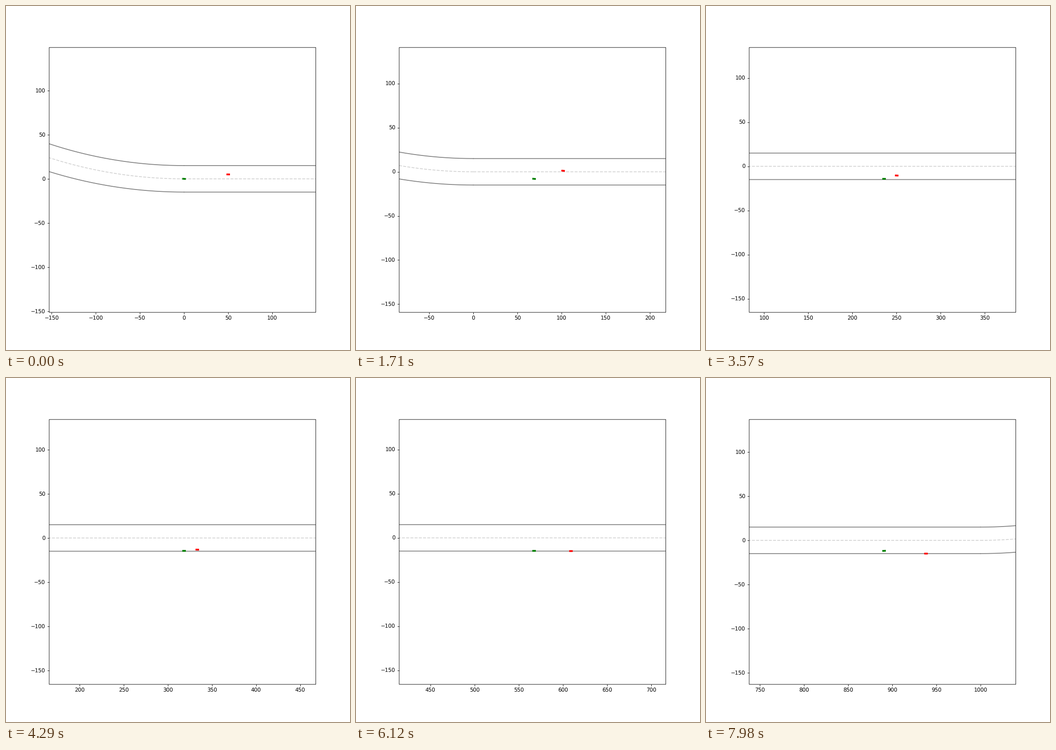
A matplotlib script that plays this animation: 748 px wide and 748 px high, repeating every 8000 ms.

```python
import numpy as np
import matplotlib.pyplot as plt
from matplotlib.animation import FuncAnimation
from matplotlib.patches import Rectangle
from matplotlib.ticker import MultipleLocator

# Soft, unsnapped edges and glyphs, as in a smoothly scaled picture.
plt.rcParams["path.snap"] = False
plt.rcParams["text.hinting"] = "none"

SIZE, INCHES = 748, 9
FRAMES, LOOP_MS = 267, 8000
STRAIGHT, RADIUS, HALF_ROAD = 1000, 500, 15
CAR_L, CAR_W = 4, 2
VIEW = 150
ACCEL, TOP_SPEED, EASE_BAND = 0.025, 5.36, 0.45


def drive(x, v, brake=range(0)):
    """Positions of a car that speeds up, easing off near top speed."""
    xs = []
    for n in range(FRAMES):
        xs.append(x)
        x += v
        if n in brake:
            v -= 2 * ACCEL
        else:
            v += ACCEL * min(1, (TOP_SPEED - v) / EASE_BAND)
    return np.array(xs)


def drift(x, y0, y1, length, power):
    """Smooth change of lane from y0 to y1."""
    return y1 + (y0 - y1) * np.exp(-((x - x[0]) / length) ** power)


def heading(x, y):
    return np.degrees(np.arctan(np.gradient(y, x)))


green_x = drive(0, 0.5065, brake=range(127, 137))
green_y = drift(green_x, 0, -14.7, 84.7, 1.18)
green_y += 0.00023 * np.maximum(green_x - 780, 0) ** 2
green_a = heading(green_x, green_y)

red_x = drive(50, 0.2065)
red_y = drift(red_x, 5, -15, 152.5, 1.43)
red_a = heading(red_x, red_y)

fig, ax = plt.subplots(figsize=(INCHES, INCHES), dpi=SIZE / INCHES)
ax.xaxis.set_major_locator(MultipleLocator(50))
ax.yaxis.set_major_locator(MultipleLocator(50))

# The frame sits a fraction of a pixel right of and below the plot area.
box = ax.get_position()
half_w = VIEW * box.width / box.height
nudge = 0.415 / SIZE
ax.spines[:].set_visible(False)
fig.add_artist(Rectangle((box.x0 + nudge, box.y0 - nudge),
                         box.width, box.height,
                         transform=fig.transFigure, fill=False, lw=0.8))


def draw_lane(offset, **style):
    """One line of the oval road, shifted to the inside by offset."""
    r = RADIUS - offset
    turn = np.linspace(-np.pi / 2, np.pi / 2, 200)
    ax.plot([0, STRAIGHT], [offset, offset], **style)
    ax.plot(STRAIGHT + r * np.cos(turn), RADIUS + r * np.sin(turn), **style)
    ax.plot(-r * np.cos(turn), RADIUS + r * np.sin(turn), **style)


draw_lane(HALF_ROAD, color="gray")
draw_lane(-HALF_ROAD, color="gray")
draw_lane(0, color="lightgray", ls="--")


def add_car(color):
    car = Rectangle((0, 0), CAR_L, CAR_W, rotation_point="center",
                    fc=color, lw=0, zorder=3)
    return ax.add_patch(car)


green, red = add_car("green"), add_car("red")


def place(car, x, y, angle):
    car.set_xy((x - CAR_L / 2, y - CAR_W / 2))
    car.set_angle(angle)


def update(n):
    place(green, green_x[n], green_y[n], green_a[n])
    place(red, red_x[n], red_y[n], red_a[n])
    cx, cy = green.get_xy()
    ax.set_xlim(cx - half_w, cx + half_w)
    ax.set_ylim(cy - VIEW, cy + VIEW)
    return green, red


anim = FuncAnimation(fig, update, frames=FRAMES, interval=LOOP_MS / FRAMES,
                     init_func=lambda: update(0), repeat=True, repeat_delay=0)
plt.show()
```
